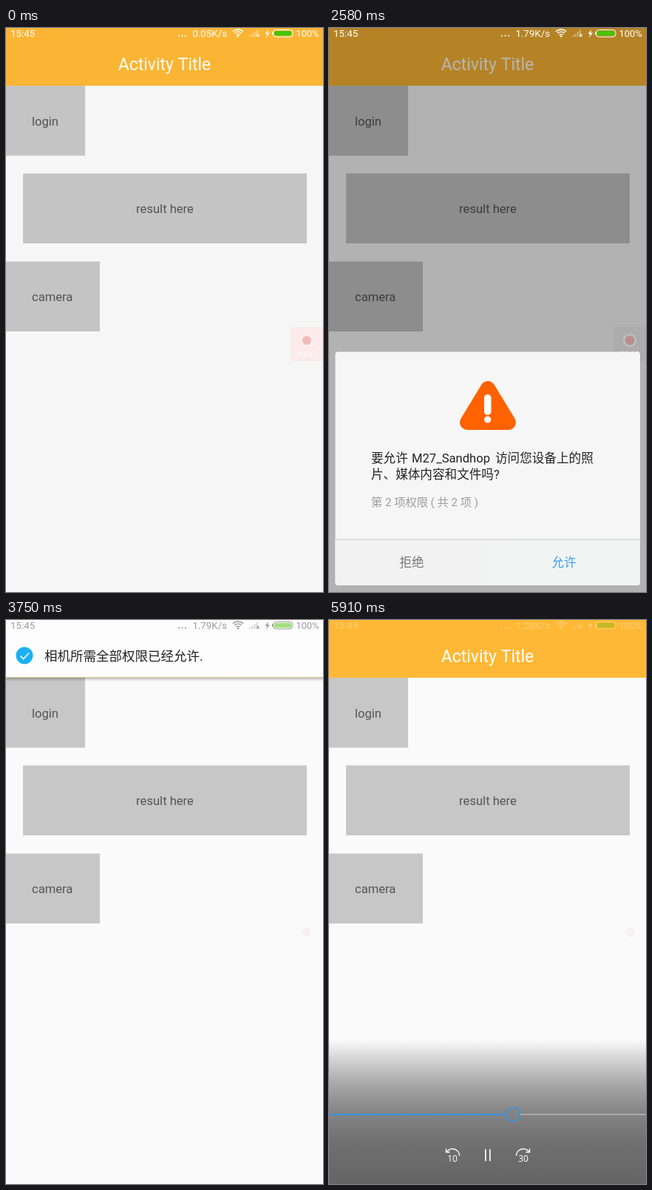
Write an HTML page with a canvas that moves like this. It is 429 px wide and 762 px high and loops after 5940 ms.

```html
<!DOCTYPE html>
<html lang="zh-CN">
<head>
<meta charset="utf-8">
<style>
html, body { margin: 0; width: 100%; height: 100%; overflow: hidden; background: #fafafa; }
canvas { display: block; }
</style>
</head>
<body>
<canvas id="stage" width="429" height="762"></canvas>
<script>
const ctx = document.getElementById('stage').getContext('2d');
const LOOP = 5940, STEP = 30, W = 429, H = 762;
const FONT = 'Roboto, "Noto Sans CJK SC", sans-serif';
const APP = 'M27_Sandhop';

const ramp = (t, a, b) => Math.min(1, Math.max(0, (t - a) / (b - a)));
const smooth = p => (1 - Math.cos(Math.PI * p)) / 2;

function rect(x, y, w, h, color) {
  ctx.fillStyle = color;
  ctx.fillRect(x, y, w, h);
}

function round(x, y, w, h, r, color) {
  ctx.beginPath();
  ctx.roundRect(x, y, w, h, r);
  ctx.fillStyle = color;
  ctx.fill();
}

function disc(x, y, r, color) {
  ctx.beginPath();
  ctx.arc(x, y, r, 0, 7);
  ctx.fillStyle = color;
  ctx.fill();
}

function line(points, color, width) {
  ctx.beginPath();
  points.forEach(p => ctx.lineTo(...p));
  ctx.strokeStyle = color;
  ctx.lineWidth = width;
  ctx.stroke();
}

function arc(x, y, r, from, to, color, width) {
  ctx.beginPath();
  ctx.arc(x, y, r, from * Math.PI, to * Math.PI);
  ctx.strokeStyle = color;
  ctx.lineWidth = width;
  ctx.stroke();
}

function text(s, x, y, size, color, align = 'left', font = FONT) {
  ctx.font = size + 'px ' + font;
  ctx.textAlign = align;
  ctx.fillStyle = color;
  ctx.fillText(s, x, y);
}

function layer(alpha, dy, draw) {
  if (alpha <= 0) return;
  ctx.save();
  ctx.globalAlpha = alpha;
  ctx.translate(0, dy);
  draw();
  ctx.restore();
}

function activity() {
  rect(0, 0, W, H, '#fafafa');
  rect(0, 0, W, 78, '#ffb835');
  text('Activity Title', 214.5, 57, 23, '#fff', 'center');
  rect(0, 78, 107, 94.5, '#c7c7c7');
  rect(23, 196.5, 384, 94.5, '#c7c7c7');
  rect(0, 315.5, 127, 94.5, '#c7c7c7');
  text('login', 35, 131.5, 16.6, '#555');
  text('result here', 215, 250, 16.6, '#555', 'center');
  text('camera', 35, 369, 16.6, '#555');
}

function recorder(t) {
  const fade = 1 - ramp(t, 3180, 3390);
  layer(fade, 0, () => {
    rect(385, 404, 44, 46, t < 30 ? 'rgba(255,215,215,.4)' : 'rgba(0,0,0,.035)');
    arc(407, 422, 8, 0, 2, 'rgba(255,255,255,.3)', 1.5);
    const tick = 7 + (t >= 630) + (t >= 1650) + (t >= 2580);
    text('00:' + String(tick).padStart(2, '0'), 407, 445, 11, '#fff', 'center');
  });
  disc(407, 422, 6, `rgba(225,60,60,${0.06 + 0.22 * fade})`);
}

function dialog(t) {
  const second = t >= 1770;
  round(8.5, 437.5, 412.5, 315.5, 4, '#f6f6f6');

  ctx.beginPath();
  ctx.moveTo(215, 487);
  ctx.lineTo(243, 533);
  ctx.lineTo(187, 533);
  ctx.closePath();
  ctx.lineJoin = 'round';
  ctx.lineWidth = 20;
  ctx.fillStyle = ctx.strokeStyle = '#ff6200';
  ctx.fill();
  ctx.stroke();
  round(210, 495, 9.5, 28, 4.7, '#fff');
  disc(214.7, 529, 4.6, '#fff');

  text('要允许', 57, 587, 16.6, '#222');
  text(APP, 112, 587, 16.6, '#222');
  text(second ? '访问您设备上的照' : '拍摄照片和录制视', 225, 587, 16.6, '#222');
  text(second ? '片、媒体内容和文件吗?' : '频吗?', 57, 609, 16.6, '#222');
  text(`第 ${second ? 2 : 1} 项权限 ( 共 2 项 )`, 57, 646, 15.2, '#9c9c9c');

  round(8.5, 691, 206.5, 62, [0, 0, 0, 4], '#f2f2f2');
  round(215, 691, 206, 62, [0, 0, 4, 0], '#f2f4f4');
  const press = t >= 2940 ? +(t < 3150) : t >= 1650 ? 1 - ramp(t, 1680, 1860) : 0;
  layer(press, 0, () => round(215, 691, 206, 62, [0, 0, 4, 0], '#e4e5e5'));
  rect(8.5, 690.5, 412.5, 1, second ? '#cacaca' : '#e6e6e6');
  text('拒绝', 112, 728, 16.5, '#777', 'center');
  text('允许', 318, 728, 16.5, '#3a9ff0', 'center');
}

function notice() {
  const shade = ctx.createLinearGradient(0, 77, 0, 83);
  shade.addColorStop(0, 'rgba(0,0,0,.28)');
  shade.addColorStop(1, 'rgba(0,0,0,0)');
  rect(0, 77, W, 6, shade);
  rect(0, 0, W, 77.5, '#fdfdfd');
  disc(25, 48, 11.5, '#1cb0f3');
  line([[19.5, 48.5], [23.5, 52.5], [31, 44.5]], '#fff', 1.6);
  text('相机所需全部权限已经允许.', 52, 54.5, 17.5, '#222');
}

function statusBar(t, color) {
  const speed = t < 630 ? '0.05' : t < 4200 ? '1.79' : '1.28';
  text('15:45', 6, 12, 13.3, color);
  [234, 238.5, 243].forEach(x => disc(x, 10.5, 1.1, color));
  text(speed + 'K/s', 299, 12, 13.3, color, 'right');
  [3.5, 6.8, 10].forEach(r => arc(314, 12, r, 1.25, 1.75, color, 1.3));
  disc(314, 11.3, 1.2, color);
  ctx.save();
  ctx.globalAlpha *= 0.4;
  [0, 1, 2, 3].forEach(i => rect(329 + i * 3.3, 10 - i * 2.4, 2, 2 + i * 2.4, color));
  ctx.restore();
  line([[339, 8], [343, 12]], color, 1);
  line([[343, 8], [339, 12]], color, 1);
  ctx.beginPath();
  [[355, 2], [350.5, 8], [353.5, 8], [352, 13], [357, 6.5], [354, 6.5]].forEach(p => ctx.lineTo(...p));
  ctx.fillStyle = color;
  ctx.fill();
  ctx.beginPath();
  ctx.roundRect(361.5, 2.5, 26.5, 9.5, 4);
  ctx.strokeStyle = color;
  ctx.lineWidth = 1;
  ctx.stroke();
  rect(360, 5.5, 1.5, 3.5, color);
  round(363, 4, 23.5, 6.5, 2.5, '#48c400');
  text('100%', 392.5, 12, 12.9, color);
}

function skip(x, dir, label) {
  ctx.save();
  ctx.translate(x, 0);
  ctx.scale(dir, 1);
  arc(0, 724, 9.5, 1.2, 2, '#fff', 1.3);
  line([[-8.5, 714], [-8.5, 719], [-3.5, 719]], '#fff', 1.3);
  ctx.restore();
  text(label, x, 732, 12, '#fff', 'center', '"Open Sans", sans-serif');
}

function player(t) {
  const shade = ctx.createLinearGradient(0, 567, 0, H);
  [[0, 0], [0.16, 0.18], [0.32, 0.34], [0.5, 0.47], [0.7, 0.55], [1, 0.6]]
    .forEach(([at, a]) => shade.addColorStop(at, `rgba(0,0,0,${a})`));
  rect(0, 567, W, H - 567, shade);
  const x = 197 + 10.4 * Math.floor((t - 4400) / 280);
  rect(0, 667, x - 9, 2, '#3a94e0');
  rect(x + 9, 667.2, W, 1.6, '#b4b4b4');
  arc(x, 668, 9.2, 0, 2, '#3a94e0', 1.8);
  skip(167, -1 * -1, '10');
  rect(211, 715, 1.6, 16, '#fff');
  rect(217, 715, 1.6, 16, '#fff');
  skip(263, -1, '30');
}

function draw(t) {
  activity();
  const dim = 0.016 + 0.274 * ramp(t, 0, 180);
  rect(0, 0, W, H, `rgba(0,0,0,${dim * (1 - ramp(t, 3165, 3390))})`);
  recorder(t);

  if (t >= 30 && t < 3370) {
    const enter = 325 * (1 - ramp(t, 0, 170)) ** 3;
    const leave = 325 * ramp(t, 3150, 3370) ** 2;
    layer(1, Math.round(enter + leave), () => dialog(t));
  }

  const shown = smooth(ramp(t, 3390, 3690)) - smooth(ramp(t, 5490, 5790));
  if (shown > 0) layer(1, -83 * (1 - shown), notice);

  const white = 1 - ramp(t, 3390, 3570) + ramp(t, 5790, 6150);
  const dark = ramp(t, 3570, 3930) - ramp(t, 5550, 5790);
  layer(white, 0, () => statusBar(t, '#fff'));
  layer(dark, 0, () => statusBar(t, '#3c3c3c'));
  layer(ramp(t, 4140, 4500), 0, () => player(t));
}

const start = performance.now();
function tick() {
  const t = (performance.now() - start) % LOOP;
  draw(Math.floor(t / STEP) * STEP);
  requestAnimationFrame(tick);
}
tick();
</script>
</body>
</html>
```
